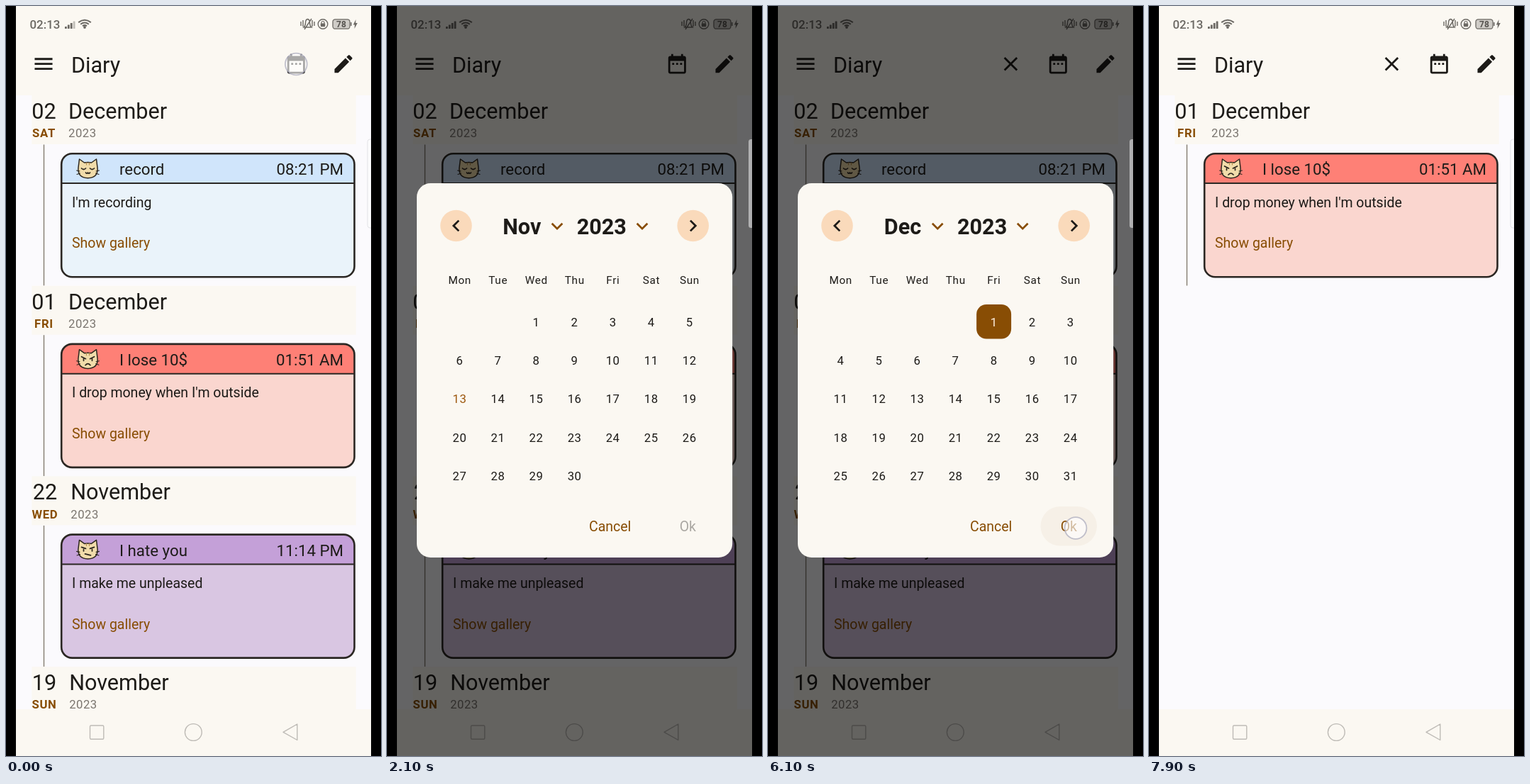
Animation of 529x1058 px, one loop 8 s. Source, as an HTML page:

```html
<!DOCTYPE html>
<html lang="en">
<head>
<meta charset="utf-8">
<title>Diary</title>
<style>
html, body { margin: 0; width: 100%; height: 100%; overflow: hidden; background: #000; }
svg { display: block; width: 100%; height: 100%; font-family: Roboto, sans-serif; }
text { white-space: pre; }
</style>
</head>
<body>
<svg id="stage" viewBox="0 0 529 1058"></svg>
<script>
const INK = '#1d1b18', BROWN = '#884d04', CREAM = '#fbf8f2', GREY = '#6c6964';
const LOOP = 8000, DP = 1.392, PITCH = 268.7;

const text = (x, y, s, size, o = {}) =>
  `<text x="${x}" y="${y}" font-size="${size}" fill="${o.fill || INK}" font-weight="${o.weight || 400}"` +
  ` text-anchor="${o.anchor || 'start'}" letter-spacing="${o.gap || 0}">${s}</text>`;
const rect = (x, y, w, h, fill, r = 0, more = '') =>
  `<rect x="${x}" y="${y}" width="${w}" height="${h}" rx="${r}" fill="${fill}" ${more}/>`;
const line = (d, color, w, more = '') =>
  `<path d="${d}" fill="none" stroke="${color}" stroke-width="${w}" ${more}/>`;
const icon = (cx, cy, d, fill = INK) =>
  `<path transform="translate(${cx} ${cy}) scale(${DP}) translate(-12 -12)" d="${d}" fill="${fill}"/>`;
const group = (id, body) => `<g id="${id}">${body}</g>`;

const ICONS = {
  menu: 'M3 18h18v-2H3zM3 13h18v-2H3zM3 6v2h18V6z',
  close: 'M19 6.41L17.59 5 12 10.59 6.41 5 5 6.41 10.59 12 5 17.59 6.41 19 12 13.41 17.59 19 19 17.59 13.41 12z',
  dates: 'M9 11H7v2h2zm4 0h-2v2h2zm4 0h-2v2h2zm2-7h-1V2h-2v2H8V2H6v2H5c-1.1 0-2 .9-2 2v14c0 1.1.9 2 2 2h14c1.1 0 2-.9 2-2V6c0-1.1-.9-2-2-2zm0 16H5V9h14z',
  edit: 'M3 17.25V21h3.75L17.81 9.94l-3.75-3.75zM20.71 7.04c.39-.39.39-1.02 0-1.41l-2.34-2.34c-.39-.39-1.02-.39-1.41 0l-1.83 1.83 3.75 3.75z',
  down: 'M16.59 8.59L12 13.17 7.41 8.59 6 10l6 6 6-6z',
  left: 'M15.41 7.41L14 6l-6 6 6 6 1.41-1.41L10.83 12z',
  right: 'M8.59 16.59L13.17 12 8.59 7.41 10 6l6 6-6 6z'
};

const FACES = {
  calm: 'M-9 -1q3 3 6 0M3 -1q3 3 6 0M-3 5q1.5 2.5 3 0q1.5 2.5 3 0',
  angry: 'M-9 -4l6 3M9 -4l-6 3M-6 -1v2.6M6 -1v2.6M-3.5 8q3.5 -4 7 0',
  sour: 'M-9 -4l6 2M9 -4l-6 2M-6 -1v2.6M6 -1v2.6M-4 5.5l8 2'
};
const cat = (x, y, face) =>
  `<g transform="translate(${x} ${y})" stroke-linecap="round" stroke-linejoin="round">` +
  `<path d="M-12 -14L-5 -9Q0 -10 5 -9L12 -14L13.5 -2Q15 12 0 12.7Q-15 12 -13.5 -2Z" fill="#f1dcaa" stroke="#2c261e" stroke-width="1.5"/>` +
  line('M-16 2l4.500 1M-15.500 7.500l4.500-1.500M16 2l-4.500 1M15.500 7.500l-4.500-1.500', '#2c261e', 1.1) +
  line('M-2 -9v3M2 -9v3', '#b58e4e', 1.2) +
  line(FACES[face], '#2c261e', 1.7) + '</g>';

const entries = [
  { day: '02', week: 'SAT', month: 'December', mid: 53.5, x: 88, face: 'calm', name: 'record', time: '08:21 PM', note: "I'm recording", head: '#d0e5fb', body: '#eaf3fa' },
  { day: '01', week: 'FRI', month: 'December', mid: 53.5, x: 88, face: 'angry', name: 'I lose 10$', time: '01:51 AM', note: "I drop money when I'm outside", head: '#fe8076', body: '#fad6cf' },
  { day: '22', week: 'WED', month: 'November', mid: 54.9, x: 91.3, face: 'sour', name: 'I hate you', time: '11:14 PM', note: 'I make me unpleased', head: '#c4a0d8', body: '#d9c6e2' },
  { day: '19', week: 'SUN', month: 'November', mid: 54, x: 89.2 }
];

function entry(e, i) {
  let s = rect(36.3, 126, 457.5, 69, CREAM) +
    text(e.mid, 159, e.day, 30.6, { anchor: 'middle' }) +
    text(e.x, 159, e.month, 30.6) +
    text(e.mid, 185.4, e.week, 16.7, { anchor: 'middle', weight: 700, fill: BROWN, gap: .7 }) +
    text(e.x, 185.4, '2023', 16.7, { fill: '#7a756f', gap: .5 });
  if (e.name) {
    s += line('M53.500 195.500V394.500', '#7d7669', 1.3) +
      rect(78.2, 208.2, 413.3, 174, e.body, 15) +
      `<path d="M78.200 250V223.200a15 15 0 0 1 15-15H476.500a15 15 0 0 1 15 15V250Z" fill="${e.head}"/>` +
      line('M78.200 250H491.500', '#2b2723', 2) +
      rect(78.2, 208.2, 413.3, 174, 'none', 15, 'stroke="#2b2723" stroke-width="2.6"') +
      cat(115.5, 230, e.face) +
      text(160, 238.3, e.name, 22.27) +
      text(476, 238.3, e.time, 22.27, { anchor: 'end' }) +
      text(93, 283.5, e.note, 19.49) +
      text(93, 341.3, 'Show gallery', 19.49, { fill: BROWN });
  }
  return `<g transform="translate(0 ${i * PITCH})">${s}</g>`;
}

function statusBar() {
  const bar = (i, id = '') => rect(83 + i * 3.9, 29 - i * 2.5, 2.8, 3 + i * 2.5, GREY, .5, id);
  const arc = r => line(`M${111 - r * .8} ${31 - r * .72}Q111 ${31 - r * 1.32} ${111 + r * .8} ${31 - r * .72}`, GREY, 2);
  return text(33.5, 32, '02:13', 16.9, { weight: 500, fill: GREY }) +
    bar(0) + bar(1) + bar(2) + bar(3, 'id="bar4"') +
    arc(11) + arc(7.3) + arc(3.8) + `<circle cx="111" cy="30" r="1.900" fill="${GREY}"/>` +
    line('M420 30q2.500-2 2.500-6q0-5 3-5.500q3 .5 3 5.500q0 4 2.500 6ZM421 33L431 18M416 22v6M419 20v9M432 20v9M435 22v6', GREY, 1.4) +
    `<circle cx="447" cy="25.500" r="6.800" fill="none" stroke="${GREY}" stroke-width="1.400"/>` +
    rect(443.8, 24.5, 6.4, 4.8, GREY, .8) + line('M445 25v-1.500a2 2 0 0 1 4 0V25', GREY, 1.2) +
    rect(461, 18.8, 24, 13.4, '#cfccc7', 3.5, `stroke="${GREY}" stroke-width="1.300"`) +
    rect(486, 23, 1.5, 5, GREY) +
    text(473, 30, '78', 12, { weight: 700, fill: '#55524e', anchor: 'middle' }) +
    `<path d="M493.500 19L489.800 26.500H492L491.500 32L495.800 24H493.200Z" fill="${GREY}"/>`;
}

function monthGrid(first, count, mark, picked) {
  let s = '';
  for (let d = 1; d <= count; d++) {
    const cell = first + d - 1;
    const x = 102.4 + cell % 7 * 54.05, y = 446 + Math.floor(cell / 7) * 54.3;
    if (d === picked) s += rect(x - 24.5, y - 25, 49, 48.5, BROWN, 14, 'id="pick"');
    s += text(x, y + 5.8, d, 16.7, {
      anchor: 'middle', gap: .5, fill: d === mark ? '#9c560c' : INK
    }).replace('<text', d === picked ? '<text id="pickNum"' : '<text');
  }
  return s;
}

const monthTitle = (name, x, arrow, yearX) =>
  text(x, 322, name, 30.6, { weight: 700 }) + icon(arrow, 310.5, ICONS.down, BROWN) +
  text(yearX, 322, '2023', 30.6, { weight: 700 }) + icon(arrow + 120, 310.5, ICONS.down, BROWN);

function dialog() {
  const disc = (x, d) => `<circle cx="${x}" cy="310" r="22.300" fill="#fadabb"/>` + icon(x, 310, d);
  const week = ['Mon', 'Tue', 'Wed', 'Thu', 'Fri', 'Sat', 'Sun'].map((w, i) =>
    text(102.7 + i * 54.05, 391.5, w, 15.3, { anchor: 'middle', gap: .7 })).join('');
  return rect(42, 250, 445.2, 528, CREAM, 19.5) +
    disc(97.5, ICONS.left) + disc(431.7, ICONS.right) + week +
    group('nov', monthTitle('Nov', 163.2, 240, 267.7) + monthGrid(2, 30, 13)) +
    group('dec', monthTitle('Dec', 163.8, 239.2, 267) + monthGrid(4, 31, 0, 1)) +
    rect(384.5, 706, 79.5, 55.5, '#f6f0e7', 27.7, 'id="ripple"') +
    text(285, 741.3, 'Cancel', 19.49, { fill: BROWN }) +
    text(424.3, 741.3, 'Ok', 19.49, { anchor: 'middle' }).replace('<text', '<text id="ok"');
}

const stage = document.getElementById('stage');
stage.innerHTML =
  '<clipPath id="screen"><rect x="14" y="0" width="501" height="1058"/></clipPath>' +
  '<rect width="529" height="1058" fill="#000"/><g clip-path="url(#screen)">' +
  rect(14, 0, 501, 1058, '#fbfafd') +
  group('all', entries.map(entry).join('')) +
  group('one', entry(entries[1], 0)) +
  rect(14, 0, 501, 126, CREAM) + rect(14, 992, 501, 66, CREAM) +
  statusBar() +
  icon(53, 81.7, ICONS.menu) + text(91.9, 93.5, 'Diary', 30.6) +
  group('clear', icon(342.4, 81.7, ICONS.close)) +
  icon(409.3, 81.7, ICONS.dates) + icon(476, 81.7, ICONS.edit) +
  rect(118.500, 1015, 19.3, 19.3, 'none', 1.5, 'stroke="#bebbb6" stroke-width="1.400"') +
  '<circle cx="264.300" cy="1024.500" r="11.900" fill="none" stroke="#bebbb6" stroke-width="1.400"/>' +
  line('M410.800 1013V1035.500L391 1024.300Z', '#bebbb6', 1.4, 'stroke-linejoin="round"') +
  rect(14, 0, 501, 1058, '#000', 0, 'id="shade"') +
  rect(510, 188, 12, 125, '#fcfcfd', 3.5, 'id="handle" stroke="#dcdce0" stroke-width=".8"') +
  group('dialog', dialog()) +
  '<circle id="touch" r="15.400" fill="#fff" fill-opacity=".62" stroke="#a9a9bb" stroke-opacity=".7" stroke-width="1.800"/></g>';

const $ = id => document.getElementById(id);
const set = (id, k, v) => $(id).setAttribute(k, v);
const show = (id, a) => set(id, 'opacity', a);
const ramp = (t, a, b) => Math.max(0, Math.min(1, (t - a) / (b - a)));

const taps = [
  { x: 409.3, y: 82, from: -200, to: 120 },
  { x: 425.8, y: 320, from: 3120, to: 3290 },
  { x: 323, y: 448, from: 4600, to: 4760 },
  { x: 434, y: 736.5, from: 6010, to: 6150 }
];

function draw(t) {
  const open = ramp(t, 950, 1070) * (1 - ramp(t, 6140, 6260));
  const turn = ramp(t, 3330, 3480), chosen = t >= 4700, done = t >= 6200;
  show('shade', open * .6);
  show('dialog', open);
  set('handle', 'fill-opacity', 1 - open * .5);
  set('handle', 'stroke-opacity', 1 - open);
  show('all', done ? 0 : 1);
  show('one', done ? 1 : 0);
  show('clear', t >= 6050 ? 1 : 0);
  show('bar4', t < 1000 ? .4 : 1);
  show('nov', 1 - turn);
  show('dec', turn);
  show('pick', chosen ? 1 : 0);
  set('pickNum', 'fill', chosen ? '#fff1e2' : INK);
  set('ok', 'fill', chosen ? BROWN : '#aaa7a2');
  show('ripple', ramp(t, 6010, 6090));

  const tap = taps.find(p => t >= p.from && t < p.to + 80);
  show('touch', tap ? ramp(t, tap.from, tap.from + 40) * (1 - ramp(t, tap.to, tap.to + 80)) : 0);
  if (tap) {
    set('touch', 'cx', tap.x);
    set('touch', 'cy', tap.y);
  }
}

const start = performance.now();
function tick() {
  draw((performance.now() - start) % LOOP);
  requestAnimationFrame(tick);
}
draw(0);
requestAnimationFrame(tick);
</script>
</body>
</html>
```
